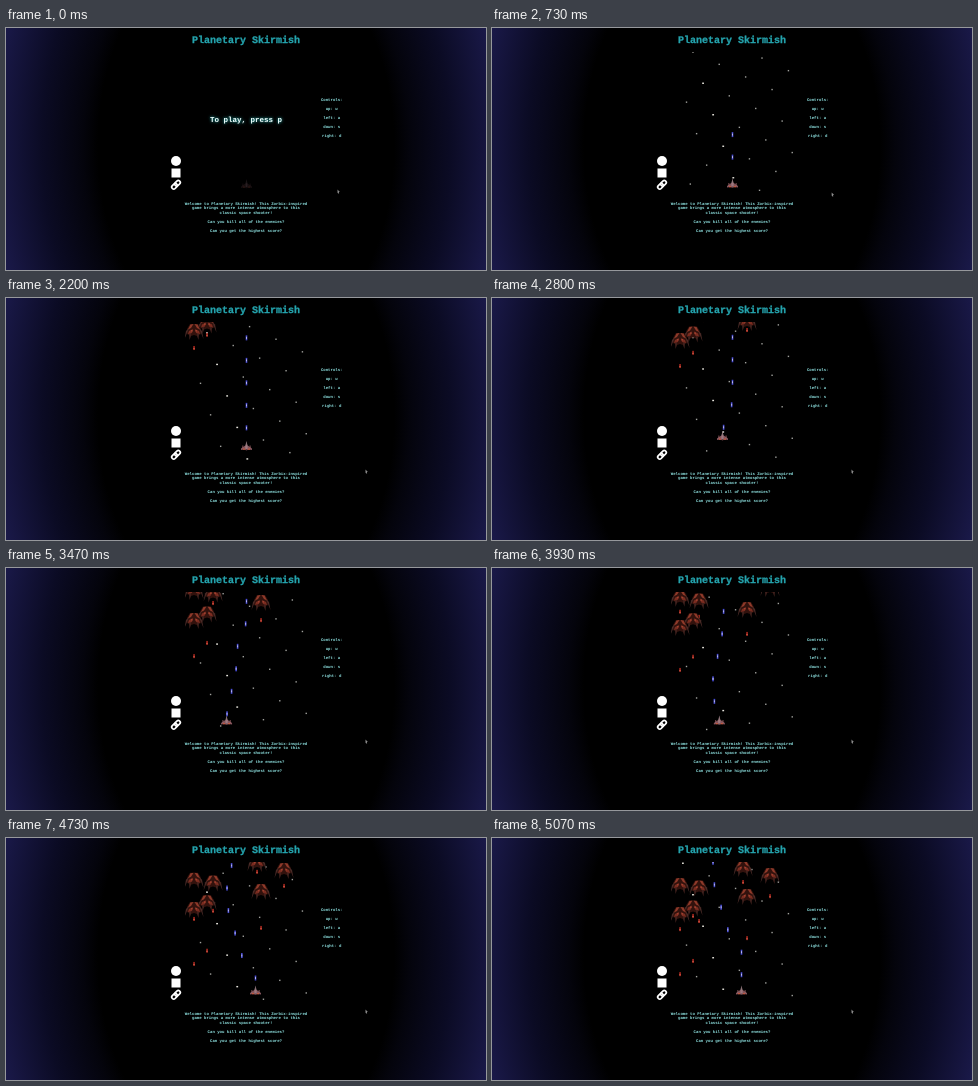
Write an HTML page with a canvas that moves like this. It is 480x242 px and loops after 5.14 s.

```html
<!DOCTYPE html>
<html lang="en">
<head>
<meta charset="utf-8">
<title>Planetary Skirmish</title>
<style>
html, body { margin: 0; width: 100%; height: 100%; overflow: hidden; background: #000; }
svg, canvas { position: absolute; left: 0; top: 0; width: 480px; height: 242px; }
text {
  font-family: "Liberation Mono", "Courier New", monospace; font-weight: bold;
  text-anchor: middle; text-rendering: geometricPrecision;
}
.title { font-size: 10px; fill: #25a4ae; stroke: #25a4ae; stroke-width: .3; }
.small { font-size: 4px; fill: #8fe3e2; }
#prompt { font-size: 7.5px; fill: #f2ffff; filter: drop-shadow(0 0 1.5px #2cc); }
</style>
</head>
<body>
<svg viewBox="0 0 480 242">
  <defs>
    <radialGradient id="sky" gradientUnits="userSpaceOnUse" cx="0" cy="0" r="1"
      gradientTransform="translate(240 118) scale(255 367)">
      <stop offset=".58" stop-color="#000"/>
      <stop offset=".64" stop-color="#04040c"/>
      <stop offset=".8" stop-color="#0b0b24"/>
      <stop offset="1" stop-color="#1a1949"/>
    </radialGradient>
  </defs>
  <rect width="480" height="242" fill="url(#sky)"/>
  <text class="title" x="240" y="15.3">Planetary Skirmish</text>
  <g class="small">
    <text x="325.7" y="73.4">Controls:</text>
    <text x="325.7" y="82.4">up: w</text>
    <text x="325.7" y="91.4">left: a</text>
    <text x="325.7" y="100.4">down: s</text>
    <text x="325.7" y="109.4">right: d</text>
    <text x="240" y="177">Welcome to Planetary Skirmish! This Zorbix-inspired</text>
    <text x="240" y="181.4">game brings a more intense atmosphere to this</text>
    <text x="240" y="185.7">classic space shooter!</text>
    <text x="240" y="195">Can you kill all of the enemies?</text>
    <text x="240" y="204">Can you get the highest score?</text>
  </g>
  <circle cx="170" cy="133" r="5" fill="#fff"/>
  <rect x="165.5" y="140.5" width="9" height="9" fill="#fff"/>
  <g transform="translate(170 156.8) rotate(-45)" fill="none" stroke="#fff" stroke-width="1.7">
    <rect x="-5.2" y="-2" width="6.2" height="4" rx="2"/>
    <rect x="-1" y="-2" width="6.2" height="4" rx="2"/>
  </g>
  <text id="prompt" x="240" y="93.6">To play, press p</text>
</svg>
<canvas width="480" height="242"></canvas>
<script>
const ctx = document.querySelector('canvas').getContext('2d');
const prompt = document.getElementById('prompt');
const LOOP = 5.14, START = 0.07;
const TOP = 24, STAR_SPEED = 7.6, BULLET_SPEED = 76, ENEMY_SPEED = 15, SHOT_SPEED = 30;
const FIRST_BULLET = 0.16, BULLET_GAP = 0.296, SHOT_GAP = 3;

// x and time of entry
const enemies = [[251, 4.67], [278, 4.2], [188, 3.54], [207, 3.37], [255, 2.8], [201, 2.04], [188, 1.6]];

// time, x, y
const shipPath = [[0, 240.5, 156], [1.47, 240.5, 155], [2.2, 240.5, 148], [2.55, 231, 141],
  [2.8, 230.5, 138], [3.45, 220.5, 152.5], [3.65, 221, 152.5], [4.4, 238, 152.5],
  [4.6, 249.5, 152.5], [LOOP, 249.5, 152.5]];
const cursorPath = [[0, 331.5, 161.5], [0.6, 331.5, 161.5], [1.05, 359.5, 171.5], [LOOP, 359.5, 171.5]];

function along(path, t) {
  const i = Math.max(1, path.findIndex(p => p[0] >= t));
  const [a, b] = [path[i - 1], path[i]];
  const k = (t - a[0]) / (b[0] - a[0]);
  return [a[1] + (b[1] - a[1]) * k, a[2] + (b[2] - a[2]) * k];
}

function box(color, x, y, w, h) {
  ctx.fillStyle = color;
  ctx.fillRect(x, y, w, h);
}

function shape(color, ...pts) {
  ctx.fillStyle = color;
  ctx.beginPath();
  for (let i = 0; i < pts.length; i += 2) ctx.lineTo(pts[i], pts[i + 1]);
  ctx.fill();
}

function at(x, y, draw) {
  ctx.save();
  ctx.translate(x, y);
  draw();
  ctx.restore();
}

// Draws one half of a symmetric sprite, then its mirror image.
function mirrored(draw) {
  draw();
  ctx.scale(-1, 1);
  draw();
}

function drawEnemy() {
  mirrored(() => {
    shape('#32120d', 0, -8, 4, -8, 7, -3, 7, 2, 3, 4, 0, 3);
    shape('#4a2a26', 5, -4, 8, -1, 9.5, 7, 7, 1);
    shape('#40211d', 3, 1, 5, 2, 4.5, 8, 3, 4);
    shape('#8f3a2a', 0.5, -8, 3.5, -7.5, 6, -2.5, 3, -4);
    shape('#7a2c20', 1, -3, 5, -1, 6, 2, 2, 1);
    box('#b04a36', 1.5, -2, 1.2, 1.5);
  });
}

function drawShip() {
  mirrored(() => {
    shape('#84545c', 0, -1, 2, 0, 5.5, 2.5, 5.5, 4, 2, 3.5, 0, 4.5);
    shape('#b8989e', 0, -5, 0.9, -1, 0.8, 3, 0, 3);
    box('#a0666a', 3.2, -0.5, 0.8, 3);
    box('#c0583e', 1.5, 2.5, 2, 1.3);
  });
}

function drawStars(t) {
  for (let i = 0; i < 29; i++) {
    const x = 190 + 112 * (i * 0.618 % 1), y = 6.3 * i - 14 + STAR_SPEED * t;
    const big = i % 5 === 0;
    box(big ? '#e6e4dc' : '#a0a19d', x, y, big ? 1.8 : 1.4, 1.4);
  }
}

function drawBullets(t, shipY) {
  for (let fired = FIRST_BULLET; fired < t; fired += BULLET_GAP) {
    const [x] = along(shipPath, fired);
    const y = 150 - BULLET_SPEED * (t - fired);
    if (y > shipY - 4) continue;
    box('#4a4ed8', x - 0.8, y - 2.5, 1.6, 5);
    box('#b9b8ee', x - 0.5, y - 1, 1, 2);
  }
}

function drawEnemies(t) {
  for (const [x, entry] of enemies) {
    const enemyY = time => TOP + 1 + ENEMY_SPEED * (time - entry);
    for (let fired = entry; fired < t; fired += SHOT_GAP) {
      const y = enemyY(fired) + 7 + SHOT_SPEED * (t - fired);
      box('#b52a20', x - 0.7, y - 2, 1.5, 4);
      box('#e8745c', x - 0.5, y, 1, 1.2);
    }
    at(x, enemyY(t), drawEnemy);
  }
}

function frame(now) {
  const t = now / 1000 % LOOP;
  const playing = t >= START;
  const [shipX, shipY] = along(shipPath, t);
  prompt.style.visibility = playing ? 'hidden' : 'visible';
  ctx.clearRect(0, 0, 480, 242);
  ctx.save();
  ctx.beginPath();
  ctx.rect(179, TOP, 124, 139);
  ctx.clip();
  if (playing) {
    drawStars(t);
    drawBullets(t, shipY);
    drawEnemies(t);
  } else {
    ctx.globalAlpha = 0.15;
  }
  at(shipX, shipY, drawShip);
  ctx.restore();
  at(...along(cursorPath, t), () => shape('#8c8c8c', 0, 0, 2.4, 2.4, 1.4, 2.6, 1.6, 4, 0.8, 4, 0, 3.2));
  requestAnimationFrame(frame);
}
requestAnimationFrame(frame);
</script>
</body>
</html>
```
